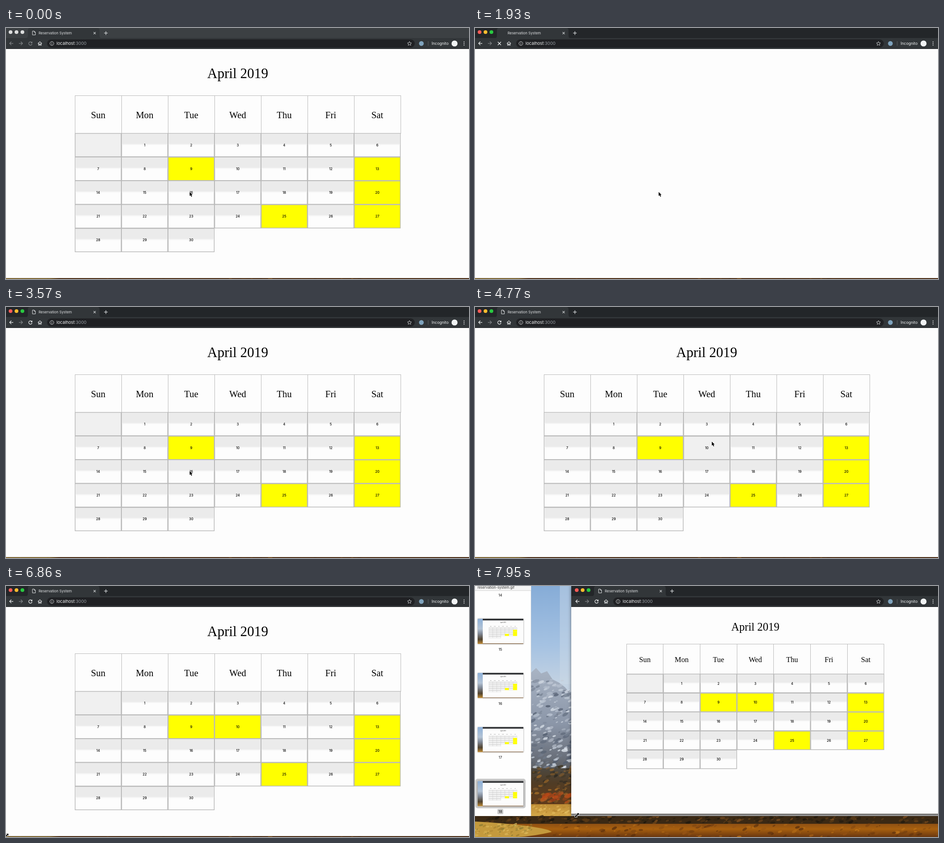
Animation of 1015 by 551 pixels, one loop 8000 ms. Source, as an HTML page with a canvas:

```html
<!DOCTYPE html>
<html lang="en">
<head>
<meta charset="utf-8">
<title>Reservation System</title>
<style>
html, body { margin: 0; width: 100%; height: 100%; overflow: hidden; background: #fdfdfd; }
canvas { display: block; width: 1015px; height: 551px; }
</style>
</head>
<body>
<canvas id="stage"></canvas>
<script>
const W = 1015, H = 551, LOOP = 8000, RIGHT = 1018;
const canvas = document.getElementById('stage');
const ratio = window.devicePixelRatio || 1;
canvas.width = W * ratio;
canvas.height = H * ratio;
const screen2d = canvas.getContext('2d');
let c = screen2d;

const UI = 'Inter, "Open Sans", sans-serif';
const SERIF = '"Liberation Serif", "Times New Roman", serif';
const DAYS = ['Sun', 'Mon', 'Tue', 'Wed', 'Thu', 'Fri', 'Sat'];

// Each entry: start time, then the state held until the next entry.
const POINTER = [
  [0, 402, 359.5], [3870, 483, 337], [4020, 506, 309], [4170, 519, 289.5], [4320, 518.5, 295],
  [5660, 121, 476], [5810, 103, 485], [5960, 84, 498], [6110, 58, 513],
  [6260, 28, 530], [6410, 10, 540], [6560, 2, 545],
  [6710, 3, 547, 'resize'], [6860, 1, 548, 'resize'], [7300, 24, 545, 'resize'],
  [7440, 97, 535, 'resize'], [7590, 173.5, 523, 'resize'],
  [7770, 205, 512, 'resize'], [7950, 223.5, 503, 'resize']
];
const FRAME = [
  [0, -2, 549], [7300, 18, 546], [7440, 95, 535], [7590, 171, 523],
  [7770, 194, 510], [7950, 211, 500]
];

const current = (track, t) => track.filter(k => k[0] <= t).pop();
const within = (t, a, b) => t >= a && t < b;

function rect(x, y, w, h, fill) {
  c.fillStyle = fill;
  c.fillRect(x, y, w, h);
}
function round(x, y, w, h, r, fill) {
  c.beginPath();
  c.roundRect(x, y, w, h, r);
  c.fillStyle = fill;
  c.fill();
}
function disc(x, y, r, fill) {
  c.beginPath();
  c.arc(x, y, r, 0, 7);
  c.fillStyle = fill;
  c.fill();
}
function text(s, x, y, font, fill, align = 'left') {
  c.font = font;
  c.fillStyle = fill;
  c.textAlign = align;
  c.fillText(s, x, y);
}
function shape(d, x, y, { fill, stroke, width = 1.2 }) {
  const p = new Path2D(d);
  c.save();
  c.translate(x, y);
  if (stroke) {
    c.strokeStyle = stroke;
    c.lineWidth = width;
    c.stroke(p);
  }
  if (fill) {
    c.fillStyle = fill;
    c.fill(p);
  }
  c.restore();
}
function gradient(y0, y1, ...stops) {
  const g = c.createLinearGradient(0, y0, 0, y1);
  stops.forEach(([at, color]) => g.addColorStop(at, color));
  return g;
}

function seeded(seed) {
  return () => (seed = (seed * 16807) % 2147483647) / 2147483647;
}

function speckle(rnd, n, x, y, w, h, size, colors) {
  for (let i = 0; i < n; i++) {
    const s = size * (0.4 + rnd());
    c.globalAlpha = 0.35 + rnd() * 0.5;
    c.beginPath();
    c.ellipse(x + rnd() * w, y + rnd() * h, s * 1.5, s * 0.7, -0.6 * rnd(), 0, 7);
    c.fillStyle = colors[Math.floor(rnd() * colors.length)];
    c.fill();
  }
  c.globalAlpha = 1;
}

function landscape() {
  const rnd = seeded(71);
  rect(0, 0, W, H, gradient(0, 215, [0, '#86acd7'], [0.6, '#a5c2e2'], [1, '#c3d2e2']));
  rect(186, 0, 30, 215, 'rgba(205,217,230,.45)');
  shape('M100 195L123 190L134 180L145 192L158 187L170 205L184 212L197 222L220 248V430H100Z',
    0, 0, { fill: gradient(180, 425, [0, '#a9b4c4'], [0.5, '#8b96a8'], [0.8, '#6a707b'], [1, '#51504c']) });
  c.save();
  c.beginPath();
  c.rect(123, 205, 95, 210);
  c.clip();
  speckle(rnd, 210, 120, 205, 100, 205, 3.6, ['#dfe6ee', '#c4cdd9', '#535e70', '#737e8f']);
  c.restore();
  rect(100, 400, 130, 82, gradient(400, 482, [0, '#4c4840'], [0.4, '#503c25'], [1, '#633b1a']));
  speckle(rnd, 90, 123, 395, 92, 83, 3.2, ['#2e2a22', '#80592b', '#403622', '#a26b28']);
  speckle(rnd, 22, 150, 453, 62, 22, 5, ['#bd4a17', '#a53d18', '#c75c20']);
  rect(100, 479, 130, 26, gradient(479, 505, [0, '#bd8c35'], [1, '#d4a849']));
  speckle(rnd, 40, 123, 481, 92, 22, 2.2, ['#ebc76b', '#b3812d', '#dcaf52']);
  rect(0, 505, W, 18, '#3b2914');
  speckle(rnd, 230, 0, 506, W, 14, 3, ['#1d170d', '#5e3c17', '#2c2212', '#815020']);
  rect(0, 522, W, 29, gradient(522, 551, [0, '#8e5013'], [0.4, '#a8600f'], [1, '#6a3710']));
  speckle(rnd, 160, 165, 524, 850, 27, 3, ['#bc7218', '#5d310d', '#955315', '#764010']);
  shape('M0 517Q60 520 115 527Q165 534 168 540Q130 549 95 551H0Z', 0, 0, { fill: '#c49a3d' });
  speckle(rnd, 80, 0, 523, 125, 25, 2.4, ['#e3c265', '#a17d2d', '#d4ad4d', '#887a31']);
}

function thumbnail(y) {
  c.save();
  c.shadowColor = 'rgba(0,0,0,.45)';
  c.shadowBlur = 3 * ratio;
  rect(6, y, 100, 55, '#fcfcfc');
  c.restore();
  rect(6, y, 11, 55, gradient(y, y + 55, [0, '#8db0d8'], [0.4, '#b3c3d5'], [0.6, '#7f8794'], [0.82, '#51432f'], [1, '#c18c35']));
  rect(17, y, 89, 3.5, '#2b2d30');
  rect(17, y + 54, 89, 1, '#6e451b');
  text('April 2019', 61.5, y + 9.3, '3px ' + SERIF, '#333', 'center');
  const p = 8.9, x0 = 30;
  DAYS.forEach((d, i) => text(d, x0 + p * (i + 0.5), y + 16.8, '2.3px ' + SERIF, '#333', 'center'));
  for (let row = 0; row < 5; row++) {
    for (let col = 0; col < (row === 4 ? 3 : 7); col++) {
      const day = row * 7 + col;
      const booked = [13, 20, 25, 27].includes(day);
      const x = x0 + col * p, cy = y + 19.3 + row * 4.6;
      rect(x, cy, p, 4.6, booked ? '#ffff00' : '#c9c9c9');
      if (!booked) {
        rect(x + 0.4, cy + 0.4, p - 0.8, 3.8, '#e6e6e6');
        rect(x + 0.4, cy + 2.3, p - 0.8, 1.9, '#f8f8f8');
      }
    }
  }
}

function sidebar() {
  rect(0, 0, 123, 505, '#fefefe');
  rect(122.5, 0, 0.5, 505, '#c6c6c6');
  rect(0, 0, 123, 10, '#f5f5f5');
  rect(0, 9.5, 123, 1, '#d0d0d0');
  text('reservation-system.gif', 46, 6, '7.6px ' + UI, '#333', 'center');
  round(1, 423, 110, 65, 5, '#cacaca');
  round(49, 489.5, 13, 11.5, 2, '#cacaca');
  for (let i = 0; i < 5; i++) {
    if (i) thumbnail(72 + (i - 1) * 118.8);
    text(String(14 + i), 55.5, 23 + i * 118.8, '500 7.6px ' + UI, '#222', 'center');
  }
}

function backdrop() {
  landscape();
  rect(211, 0, W, 505, '#a2a2a2');
  sidebar();
}

function browserBar(left, focused, loading, hasIcon) {
  const dx = left + 2, light = '#f1f3f4', dim = '#84878a';
  const active = focused ? light : dim;
  rect(left, 0, RIGHT - left, 23, focused ? '#232629' : '#3c4043');
  rect(left, 22, RIGHT - left, 23.5, '#323639');
  rect(left, 45, RIGHT - left, 1, '#1f2123');
  shape('M43 22.5Q48 22 48 17V5Q48 0 53 0H200Q205 0 205 5V17Q205 22 210 22.5Z', dx, 0, { fill: '#323639' });
  (focused ? ['#fc5b57', '#fdbc2e', '#29c941'] : ['#dcdddd', '#dcdddd', '#dcdddd'])
    .forEach((color, i) => disc(dx + 10 + i * 13, 9, 4.1, color));
  if (hasIcon) shape('M-3 -4.2H1L3.4 -1.8V4.2H-3ZM1 -4V-1.7H3.2', dx + 61, 11, { stroke: '#e4e6e8', width: 1 });
  text('Reservation System', dx + 71.5, 13.8, '7.75px ' + UI, '#e2e4e6');
  shape('M-2.4 -2.4L2.4 2.4M2.4 -2.4L-2.4 2.4', dx + 194.3, 11.2, { stroke: '#d0d3d5', width: 1.1 });
  shape('M-4 0H4M0 -4V4', dx + 219, 11.2, { stroke: '#d5d8da', width: 1.3 });

  const arrow = 'M4.2 0H-3.6M0 -3.8L-3.8 0L0 3.8';
  shape(arrow, dx + 11.7, 33.8, { stroke: active });
  shape('M-4.2 0H3.6M0 -3.8L3.8 0L0 3.8', dx + 32.5, 33.8, { stroke: dim });
  if (loading) {
    shape('M-3.5 -3.5L3.5 3.5M3.5 -3.5L-3.5 3.5', dx + 53.5, 34, { stroke: light, width: 1.3 });
  } else {
    shape('M2.7 -2.5A3.7 3.7 0 1 0 3.6 1', dx + 53.5, 34, { stroke: active });
    shape('M4.2 -4.4V-0.4H0.2Z', dx + 53.5, 34, { fill: active });
  }
  shape('M-4.4 0.2L0 -3.8L4.4 0.2M-2.9 -1V3.8H-0.9V1H0.9V3.8H2.9V-1', dx + 74.3, 34, { stroke: light, width: 1.1 });

  round(dx + 90, 25, 806 - dx, 18, 9, '#202124');
  shape('M4.2 0A4.2 4.2 0 1 1 -4.2 0A4.2 4.2 0 1 1 4.2 0M0 -0.5V2.4M0 -2.4V-1.3', dx + 100.6, 34, { stroke: '#d8dadc', width: 1 });
  text('localhost', dx + 110.7, 37.3, '9.3px ' + UI, '#f1f3f4');
  text(':3000', dx + 110.7 + c.measureText('localhost').width, 37.3, '9.3px ' + UI, '#9aa0a6');

  shape('M0 -4.4L1.3 -1.4L4.5 -1.1L2.1 1L2.8 4.1L0 2.5L-2.8 4.1L-2.1 1L-4.5 -1.1L-1.3 -1.4Z', 884.5, 34, { stroke: '#d5d8da', width: 0.9 });
  disc(910.6, 34, 5.2, '#7fa3bd');
  rect(925, 29, 1, 10, '#5b5f62');
  text('Incognito', 933, 37, '8.5px ' + UI, '#f1f3f4');
  disc(983.3, 34, 6.6, '#f1f3f4');
  [30.4, 34, 37.6].forEach(y => disc(1004.2, y, 1, '#e8eaed'));
}

function calendar(left, booked, pressed, focusedDay) {
  const vw = RIGHT - left, mid = (RIGHT + left) / 2;
  const col = vw * 0.1, x0 = mid - vw * 0.35;
  const top = 148 - (1020 - vw) * 0.0962;
  const head = vw * 0.0813, row = 1.9 + vw * 0.0493;
  const snap = v => Math.floor(v) + 0.5;
  text('April 2019', mid, 109.6 - (1020 - vw) * 0.0555, vw * 0.03 + 'px ' + SERIF, '#000', 'center');

  c.strokeStyle = '#bababa';
  c.lineWidth = 1;
  DAYS.forEach((name, i) => {
    const x = snap(x0 + i * col);
    c.strokeRect(x, snap(top), snap(x0 + (i + 1) * col) - x, head);
    text(name, x0 + (i + 0.5) * col, top + head / 2 + vw * 0.0083, vw * 0.02 + 'px ' + SERIF, '#000', 'center');
  });

  for (let day = 0; day <= 30; day++) {
    const x = x0 + (day % 7) * col, y = top + head + Math.floor(day / 7) * row;
    const ix = x + 1.3, iy = y + 1.3, iw = col - 2.6, ih = row - 2.6;
    rect(x - 0.2, y - 0.2, col + 0.4, row + 0.4, '#b9b9b9');
    if (booked.includes(day)) {
      rect(ix, iy, iw, ih, '#ffff00');
    } else if (day === pressed) {
      rect(ix, iy, iw, ih, '#f0f0f0');
    } else {
      rect(ix, iy, iw, ih, '#fdfdfd');
      rect(ix, iy, iw, ih * 0.5, '#f6f6f6');
      rect(ix, iy, iw, ih * 0.45, '#ebebeb');
    }
    if (day) text(String(day), x + col / 2, y + row / 2 + 2.7, '500 7.3px ' + UI, '#000', 'center');
  }
  if (focusedDay) {
    c.strokeStyle = '#86b2e2';
    c.lineWidth = 2;
    c.strokeRect(x0 + (focusedDay % 7) * col, top + head + Math.floor(focusedDay / 7) * row, col, row);
  }
}

function pointer([, x, y, kind]) {
  c.lineJoin = 'round';
  const look = { fill: '#000', stroke: '#fff', width: 1.6 };
  if (kind === 'resize') {
    shape('M4.3 -4.3V0.2L2.8 -1.3L-1.3 2.8L0.2 4.3H-4.3V-0.2L-2.8 1.3L1.3 -2.8L-0.2 -4.3Z', x, y, look);
  } else {
    shape('M0.6 0.4V9.2L2.6 7.4L4.2 11L5.8 10.3L4.3 6.8H6.9Z', x, y, look);
  }
  c.lineJoin = 'miter';
}

const scene = document.createElement('canvas');
scene.width = canvas.width;
scene.height = canvas.height;
c = scene.getContext('2d');
c.scale(ratio, ratio);
backdrop();
c = screen2d;

function draw(t) {
  const [, left, bottom] = current(FRAME, t);
  const blank = within(t, 1930, 2080) || within(t, 3430, 3570) || within(t, 5210, 5360);
  const loading = blank || within(t, 2080, 2230);
  const booked = [9, 13, 20, 25, 27];
  if (within(t, 2080, 3570)) booked.push(16);
  if (t >= 5360) booked.push(10);
  const pressed = within(t, 890, 1930) ? 16 : within(t, 4620, 5210) ? 10 : 0;

  c.setTransform(ratio, 0, 0, ratio, 0, 0);
  c.drawImage(scene, 0, 0, W, H);
  c.save();
  c.shadowColor = 'rgba(0,0,0,.5)';
  c.shadowBlur = 7 * ratio;
  rect(left, 0, RIGHT - left, bottom, '#fdfdfd');
  c.restore();
  rect(left, bottom, RIGHT - left, 1, 'rgba(25,18,10,.6)');
  browserBar(left, t >= 290, loading, !loading);
  if (!blank) calendar(left, booked, pressed, within(t, 2980, 3430) ? 16 : 0);
  pointer(current(POINTER, t));
}

const start = performance.now();
function tick() {
  draw((performance.now() - start) % LOOP);
  requestAnimationFrame(tick);
}
tick();
</script>
</body>
</html>
```
